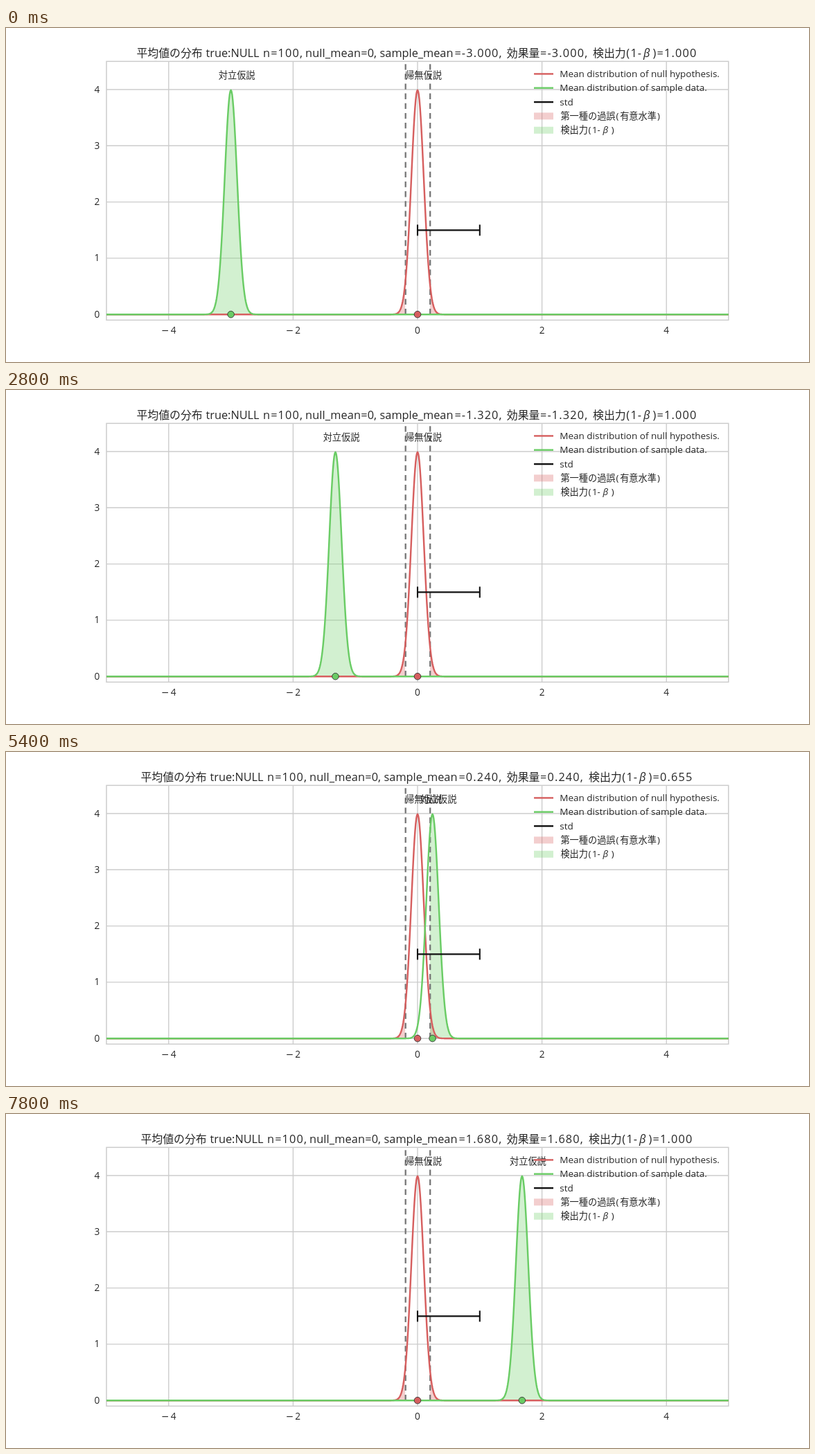
Write an HTML page that moves like this. It is 1159 by 483 pixels and loops after 8 s.

```html
<!DOCTYPE html>
<html lang="ja">
<head>
<meta charset="utf-8">
<title>平均値の分布</title>
<style>
  html, body { margin: 0; width: 100%; height: 100%; overflow: hidden; background: #fff; }
  svg { display: block; width: 1159px; height: 483px; }
  text { font-family: "Open Sans", "Noto Sans CJK JP", "Noto Sans CJK", sans-serif; fill: #262626; white-space: pre; }
  .minus { font-family: "DejaVu Sans", sans-serif; }
  .beta { font-family: "Open Sans", sans-serif; font-style: italic; }
</style>
</head>
<body>
<svg id="stage" viewBox="0 0 1159 483"></svg>
<script>
const RED = '#d65f5f', GREEN = '#6acc65', GRID = '#cccccc', INK = '#262626';
const LEFT = 145, RIGHT = 1042.8, TOP = 48.3, BOTTOM = 422.4;
const SIGMA = 0.1, CRIT = 0.2, STEP_MS = 200, STEPS = 40;
const px = x => 594 + x * 89.8;
const py = y => 414.2 - y * 81.3;

const svg = document.getElementById('stage');

function add(tag, attrs, parent = svg) {
  const el = document.createElementNS('http://www.w3.org/2000/svg', tag);
  for (const key in attrs) el.setAttribute(key, attrs[key]);
  parent.appendChild(el);
  return el;
}

function line(x1, y1, x2, y2, stroke, width, extra = {}) {
  return add('line', { x1, y1, x2, y2, stroke, 'stroke-width': width, ...extra });
}

function label(x, y, str, size, extra = {}) {
  const el = add('text', { x, y, 'font-size': size, ...extra });
  el.textContent = str;
  return el;
}

const density = (x, mean) =>
  Math.exp(-(((x - mean) / SIGMA) ** 2) / 2) / (SIGMA * Math.sqrt(2 * Math.PI));

// Standard normal cumulative distribution
function cdf(z) {
  const x = Math.abs(z) / Math.SQRT2, t = 1 / (1 + 0.3275911 * x);
  const poly = t * (0.254829592 + t * (-0.284496736 + t * (1.421413741 + t * (-1.453152027 + t * 1.061405429))));
  const erf = 1 - poly * Math.exp(-x * x);
  return z < 0 ? (1 - erf) / 2 : (1 + erf) / 2;
}

function points(mean, from, to) {
  const list = [], n = Math.max(1, Math.round((to - from) / 0.01));
  for (let i = 0; i <= n; i++) {
    const x = from + (to - from) * i / n;
    list.push(px(x).toFixed(2) + ' ' + py(density(x, mean)).toFixed(2));
  }
  return list.join('L');
}

function curvePath(mean) {
  return `M${LEFT} ${py(0)}L${points(mean, mean - 0.6, mean + 0.6)}L${RIGHT} ${py(0)}`;
}

function area(mean, from, to) {
  if (to <= from) return '';
  return `M${px(from)} ${py(0)}L${points(mean, from, to)}L${px(to)} ${py(0)}Z`;
}

// Both regions beyond the critical values
const tailPath = mean =>
  area(mean, mean - 0.6, Math.min(-CRIT, mean + 0.6)) +
  area(mean, Math.max(CRIT, mean - 0.6), mean + 0.6);

// Grid and axis labels
for (const v of [-4, -2, 0, 2, 4]) {
  line(px(v), TOP, px(v), BOTTOM, GRID, 1.39);
  label(px(v) + (v < 0 ? 6.8 : 0), 442, Math.abs(v), 13.6, { 'text-anchor': 'middle' });
  if (v < 0) label(px(v) - 5, 442, '−', 13.6, { 'text-anchor': 'middle', class: 'minus' });
}
for (let v = 0; v <= 4; v++) {
  line(LEFT, py(v), RIGHT, py(v), GRID, 1.39);
  label(135.2, py(v) + 4.5, v, 13.6, { 'text-anchor': 'end' });
}
add('rect', { x: LEFT, y: TOP, width: RIGHT - LEFT, height: BOTTOM - TOP, fill: 'none', stroke: GRID, 'stroke-width': 1.5 });

// Plot
add('path', { d: tailPath(0), fill: RED, 'fill-opacity': 0.3 });
const power = add('path', { fill: GREEN, 'fill-opacity': 0.3 });
for (const x of [576.7, 612.2])
  line(x, py(0), x, TOP + 3.7, '#777777', 2.3, { 'stroke-dasharray': '8.3 5.85' });
const stroke = { fill: 'none', 'stroke-width': 2.43, 'stroke-linejoin': 'round' };
add('path', { d: curvePath(0), stroke: RED, ...stroke });
const sample = add('path', { stroke: GREEN, ...stroke });
line(px(0), 292.4, px(1), 292.4, '#111', 2.4);
for (const x of [0, 1]) line(px(x), 284.4, px(x), 300.4, '#111', 2.1);
const dot = { cy: py(0), r: 4.8, stroke: '#333', 'stroke-width': 0.9 };
add('circle', { cx: px(0), fill: RED, ...dot });
const sampleDot = add('circle', { fill: GREEN, ...dot });

label(px(0) - 17.8, 73.4, '帰無仮説', 13.2);
const sampleLabel = label(0, 73.4, '対立仮説', 13.2);

// Legend
[[66.4, RED, 'Mean distribution of null hypothesis.'],
 [86.7, GREEN, 'Mean distribution of sample data.'],
 [107.1, '#111', 'std']].forEach(([y, color, str]) => {
  line(762, y, 790, y, color, 2.43);
  label(799.2, y + 4.6, str, 13.5);
});
[[127.4, RED], [147.8, GREEN]].forEach(([y, fill]) =>
  add('rect', { x: 762, y: y - 5, width: 28, height: 10, fill, 'fill-opacity': 0.3 }));
[[800.4, '第一種の過誤'], [880.4, '('], [886.2, '有意水準'], [940, ')']]
  .forEach(([x, str]) => label(x, 131.8, str, 13.2));
[[800.4, '検出力'], [840.6, '('], [846, '1-'], [873.8, ')']]
  .forEach(([x, str]) => label(x, 152.2, str, 13.2));
label(861.5, 152.2, 'β', 13.2, { class: 'beta' });

// Title: side -1 sits left of the effect size, 1 right of it
const SIZE = 16.3, BASE = 41.6, wide = { 'letter-spacing': 1.15 };
const title = [
  [188.4, -1, '平均値の分布', { 'font-size': 15.9 }],
  [288.6, -1, 'true:NULL'],
  [371, -1, 'n=100,', wide],
  [432, -1, 'null_mean=0,', { 'letter-spacing': 0.15 }],
  [539.6, -1, 'sample_mean'],
  [647.4, -1, '', wide],
  [722.8, 0, '効果量', { 'font-size': 15.9 }],
  [771, 0, '', wide],
  [847, 1, '検出力', { 'font-size': 15.9 }],
  [895.2, 1, '('],
  [901.4, 1, '1-', wide],
  [920, 1, 'β', { class: 'beta' }],
  [933.4, 1, ')'],
  [939.6, 1, '', wide],
].map(([x, side, str, extra]) => ({ x, side, el: label(x, BASE, str, SIZE, extra) }));
const meanText = title[5].el, effectText = title[7].el, powerText = title[13].el;

let shown = -1;
function show(step) {
  if (step === shown) return;
  shown = step;
  const mean = (12 * step - 300) / 100;
  power.setAttribute('d', tailPath(mean));
  sample.setAttribute('d', curvePath(mean));
  sampleDot.setAttribute('cx', px(mean));
  sampleLabel.setAttribute('x', px(mean) - 17.8);

  const shift = mean < 0 ? 0 : 6;
  for (const part of title) part.el.setAttribute('x', part.x - part.side * shift);
  const value = `=${mean.toFixed(3)},`;
  meanText.textContent = effectText.textContent = value;
  const beta = cdf((-CRIT - mean) / SIGMA) + cdf((mean - CRIT) / SIGMA);
  powerText.textContent = '=' + beta.toFixed(3);
}

const start = performance.now();
function tick() {
  show(Math.floor((performance.now() - start) / STEP_MS) % STEPS);
  requestAnimationFrame(tick);
}
show(0);
requestAnimationFrame(tick);
</script>
</body>
</html>
```
